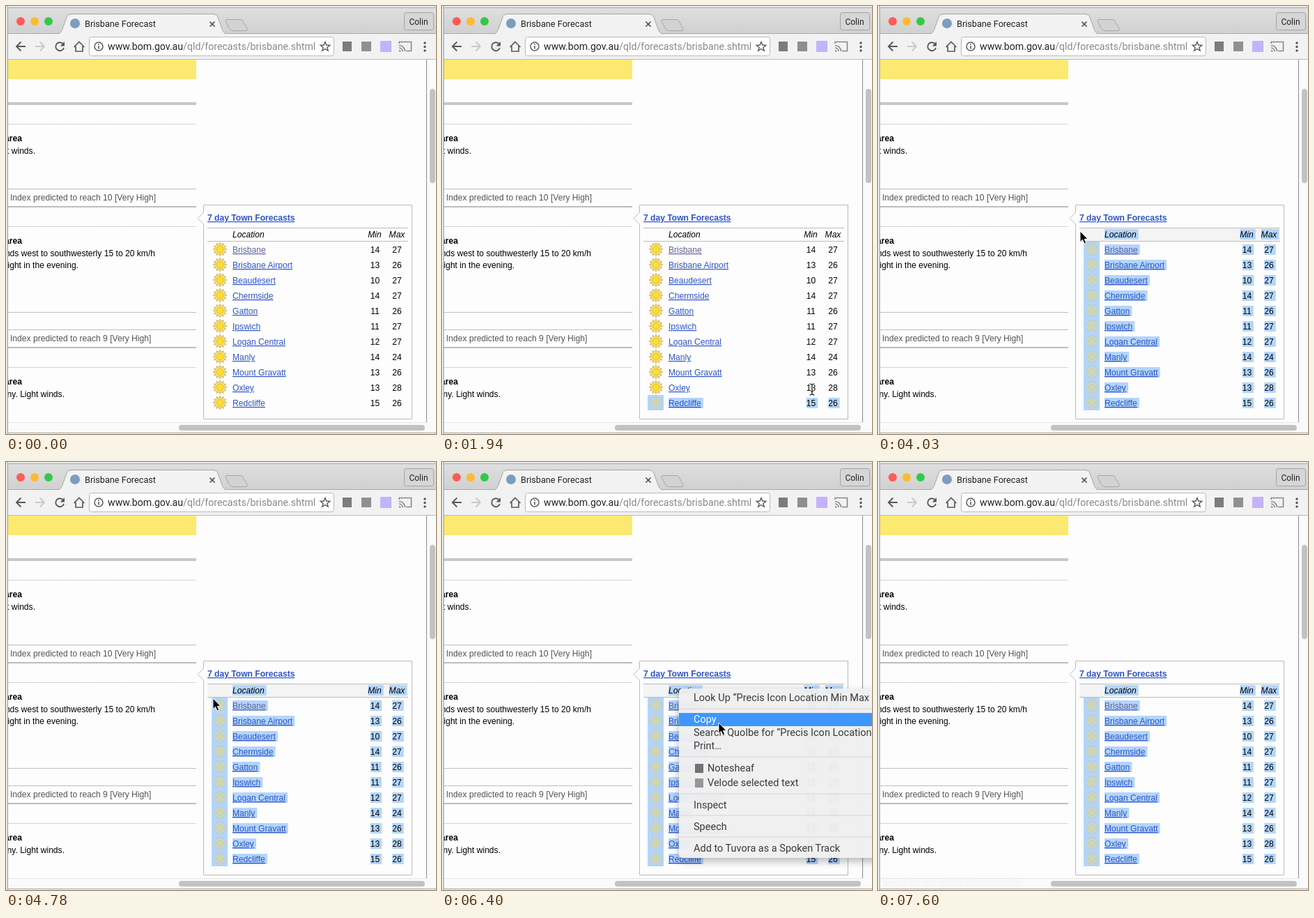
An HTML page for the animation above (8000 ms loop, 617x614 px).

```html
<!DOCTYPE html>
<html lang="en">
<head>
<meta charset="utf-8">
<title>Brisbane Forecast</title>
<style>
html, body { margin: 0; width: 100%; height: 100%; overflow: hidden; background: #fff; }
svg { display: block; width: 617px; height: 614px; }
text { white-space: pre; font: 12.1px "Liberation Sans", Arial, sans-serif; fill: #000; }
.ui { font-family: Roboto, "Open Sans", sans-serif; }
.link { fill: #2f55c4; text-decoration: underline; }
.seen { fill: #62629a; }
.bold { font-weight: bold; }
.head { font-style: italic; }
.mid { text-anchor: middle; }
.end { text-anchor: end; }
.note { fill: #555; }
.item { font-size: 14.5px; fill: #3a3a3a; }
.icon { fill: none; stroke: #5a5a5a; stroke-width: 1.9; }
</style>
</head>
<body>
<svg id="stage" viewBox="0 0 617 614">
  <defs>
    <linearGradient id="strip" x1="0" y1="0" x2="0" y2="1">
      <stop offset="0" stop-color="#e0e0e0"/><stop offset="1" stop-color="#d0d0d0"/>
    </linearGradient>
    <g id="sun"></g>
    <filter id="shade" x="-10%" y="-10%" width="120%" height="125%">
      <feDropShadow dx="0" dy="5" stdDeviation="6" flood-color="#000" flood-opacity=".28"/>
    </filter>
  </defs>
  <rect width="617" height="614" fill="#fdfdfd"/>
  <g id="page"></g>
  <g id="panel"></g>
  <g id="bars">
    <path d="M603.5 77V597" stroke="#8c8c8c"/>
    <rect x="604" y="77" width="13" height="535" fill="#fafafa"/>
    <rect x="3" y="597" width="614" height="15" fill="#fafafa"/>
    <path d="M3 597.5H604" stroke="#e6e6e6"/>
    <rect x="608" y="119" width="8" height="135" rx="4" fill="#c2c2c2"/>
    <rect x="248" y="601" width="353" height="8" rx="4" fill="#c2c2c2"/>
  </g>
  <g id="chrome">
    <rect width="617" height="40" fill="url(#strip)"/>
    <rect width="617" height="2" fill="#e9e9e9"/>
    <path d="M2 2.5H617" stroke="#a8a8a8"/>
    <rect x="3" y="39" width="614" height="37" fill="#f2f2f2"/>
    <path d="M3 39.5H617" stroke="#ababab"/>
    <path d="M3 76.5H617" stroke="#bdbdbd"/>
    <path d="M74 40C79 39 79 37 81 33L87 16Q89 11.500 93 11.500H298Q302 11.500 304 16L310 33C312 37 312 39 317 40" fill="#f2f2f2" stroke="#a4a4a4"/>
    <path d="M318 19.500H337Q339 19.500 340 21.500L346 33Q347 35.500 344 35.500H325Q322 35.500 321 33L315 22Q314 19.500 318 19.500Z" fill="#d3d3d3" stroke="#a6a6a6"/>
    <circle cx="99" cy="25" r="7" fill="#7d9cc0"/>
    <path d="M292.500 22.500l7 7m0-7l-7 7" stroke="#444" stroke-width="1.500"/>
    <rect x="571.500" y="9.500" width="42" height="25" rx="3" fill="#d6d6d6" stroke="#a2a2a2"/>
    <rect x="119.500" y="44.500" width="351" height="27" rx="3" fill="#fff" stroke="#b9b9b9"/>
    <path class="icon" d="M28 58H15.500M21.500 51.500L15 58l6.500 6.500"/>
    <path class="icon" d="M42 58H54.500M48.500 51.500L55 58l-6.500 6.500" style="stroke:#cacaca"/>
    <path class="icon" d="M82 54.500A6 6 0 1 0 83 60"/>
    <path d="M84 51V57.500H77.500Z" fill="#5a5a5a"/>
    <path class="icon" d="M97.500 59L105 51.500 112.500 59M100 57.500V65H110V57.500" style="stroke-width:1.700"/>
    <circle class="icon" cx="133" cy="58" r="6" style="stroke-width:1.500"/>
    <path d="M133 57V61.500M133 54V55.700" stroke="#5a5a5a" stroke-width="1.600"/>
    <path class="icon" d="M458 51.500L459.800 56 464.700 56.300 460.900 59.400 462.200 64.200 458 61.500 453.800 64.200 455.100 59.400 451.300 56.300 456.200 56Z" style="stroke-width:1.400"/>
    <rect x="483" y="51" width="13" height="14" fill="#7c7c7c"/>
    <rect x="510" y="51" width="14" height="14" fill="#8f8f8f"/>
    <rect x="537" y="50" width="16" height="16" fill="#c2b3fc"/>
    <path class="icon" d="M564 54V51.500H581.500V64.500H574M564 56.500A8.500 8.500 0 0 1 572.500 65M564 60A5 5 0 0 1 569 65" style="stroke:#888;stroke-width:1.600"/>
    <path d="M564 63V65.500H566.500A2.500 2.500 0 0 0 564 63Z" fill="#888"/>
    <g fill="#555"><circle cx="601" cy="53" r="1.700"/><circle cx="601" cy="58.500" r="1.700"/><circle cx="601" cy="64" r="1.700"/></g>
  </g>
  <rect width="2" height="614" fill="#e6e6e6"/>
  <rect x="2" width="1" height="614" fill="#a0a0a0"/>
  <path d="M2 612.500H617" stroke="#a0a0a0"/>
  <g id="status">
    <rect x="2.500" y="595.500" width="203" height="17" fill="#f1f1f1" stroke="#c8c8c8"/>
  </g>
  <g id="menu"></g>
  <path id="arrow" d="M0 0V15.500L3.500 12.200 6 18 8.700 16.900 6.300 11.300H11Z" stroke="#fff" stroke-width="1"/>
  <g id="beam" fill="none">
    <path d="M-3.500-8Q0-8 0-5.500V5.500Q0 8-3.500 8M3.500-8Q0-8 0-5.500V5.500Q0 8 3.500 8M-2 3H2" stroke="#fff" stroke-width="2.800"/>
    <path d="M-3.500-8Q0-8 0-5.500V5.500Q0 8-3.500 8M3.500-8Q0-8 0-5.500V5.500Q0 8 3.500 8M-2 3H2" stroke="#111" stroke-width="1.200"/>
  </g>
</svg>
<script>
const $ = id => document.getElementById(id);
const BLUE = '#b2d5fd', TICK = 149, LOOP = 8000;

function add(parent, tag, attrs, str) {
  const el = document.createElementNS('http://www.w3.org/2000/svg', tag);
  for (const k in attrs) el.setAttribute(k, attrs[k]);
  if (str) el.textContent = str;
  parent.append(el);
  return el;
}
const text = (p, x, y, str, cls = '') => add(p, 'text', { x, y, class: cls }, str);
const box = (p, x, y, width, height, fill) => add(p, 'rect', { x, y, width, height, fill });
const line = (p, x1, x2, y, stroke, w = 1, dash = 'none') =>
  add(p, 'path', { d: `M${x1} ${y}H${x2}`, stroke, 'stroke-width': w, 'stroke-dasharray': dash });
const show = (el, on) => { el.style.display = on ? '' : 'none'; };

// Browser labels
const chrome = $('chrome');
for (const [x, c] of [[21, '#fc5b57'], [41, '#fcbb33'], [61, '#34c84a']])
  add(chrome, 'circle', { cx: x, cy: 22, r: 6, fill: c });
text(chrome, 113, 30, 'Brisbane Forecast', 'ui').style.cssText = 'font-size:12.7px;fill:#222';
text(chrome, 592, 27, 'Colin', 'ui mid').style.cssText = 'font-size:12px;fill:#222';
const url = text(chrome, 146, 63, '', 'ui');
url.style.fontSize = '14.15px';
add(url, 'tspan', { fill: '#222' }, 'www.bom.gov.au');
add(url, 'tspan', { fill: '#888' }, '/qld/forecasts/brisbane.shtml');
text($('status'), 7, 608, 'www.bom.gov.au/qld/forecasts/bris…', 'ui note');

// Left column
const page = $('page');
box(page, 3, 77, 270, 28, '#fbe972');
line(page, 3, 273, 140, '#c8c8c8', 4);
for (const y of [169.5, 316.5, 518.5]) line(page, 3, 273, y, '#aaa', 1, '1 1');
for (const y of [262.5, 439.5, 464.5]) line(page, 3, 273, y, '#bdbdbd');
for (const y of [288, 490]) line(page, 3, 273, y, '#bdbdbd', 2);
for (const y of [194, 341, 543]) text(page, 23, y, 'Brisbane area', 'bold end');
text(page, 42, 212, 'Light winds.', 'end');
text(page, 214, 359, 'Winds west to southwesterly 15 to 20 km/h', 'end');
text(page, 104, 376, 'becoming light in the evening.', 'end');
text(page, 84, 561, 'Sunny. Light winds.', 'end');
text(page, 6, 279, 'Index predicted to reach 10 [Very High]', 'note');
text(page, 6, 481, 'Index predicted to reach 9 [Very High]', 'note');

// Sun symbol
const rays = Array.from({ length: 24 }, (_, i) => {
  const r = i % 2 ? 7.5 : 10.8, a = i * Math.PI / 12;
  return `${(r * Math.sin(a)).toFixed(1)},${(-r * Math.cos(a)).toFixed(1)}`;
});
add($('sun'), 'polygon', { points: rays.join(' '), fill: '#d9c06c' });
add($('sun'), 'circle', { r: 6.8, fill: '#fff3a0' });
add($('sun'), 'circle', { r: 5.2, fill: '#fbdd35', stroke: '#e3b622' });

// Forecast table
const panel = $('panel');
add(panel, 'path', { d: 'M283.5 285.5H582.5V592.5H283.5V313L275 304.500 283.500 296Z', fill: '#fdfdfd', stroke: '#bbb' });
const hover = box(panel, 289, 319, 288, 18, '#f4f4f4');
line(panel, 289, 577, 318.5, '#bbb');
line(panel, 289, 577, 337.5, '#bbb');
text(panel, 289, 308, '7 day Town Forecasts', 'link bold');

const towns = [
  ['Brisbane', 14, 27], ['Brisbane Airport', 13, 26], ['Beaudesert', 10, 27],
  ['Chermside', 14, 27], ['Gatton', 11, 26], ['Ipswich', 11, 27],
  ['Logan Central', 12, 27], ['Manly', 14, 24], ['Mount Gravatt', 13, 26],
  ['Oxley', 13, 28], ['Redcliffe', 15, 26]
];
const cells = [];
function cell(row, x, y, str, cls) {
  const back = box(panel, x, y - 12, 10, 15, BLUE);
  const el = text(panel, x, y, str, cls);
  const w = el.getComputedTextLength();
  const left = cls.includes('mid') ? x - w / 2 : x;
  cells.push({ row, left, right: left + w + 3, back });
}
cell(-1, 325, 332, 'Location', 'head');
cell(-1, 529, 332, 'Min', 'head mid');
cell(-1, 561, 332, 'Max', 'head mid');
towns.forEach(([name, min, max], i) => {
  const y = 354 + 22 * i;
  const back = box(panel, 295, y - 16, 23, 22, BLUE);
  const sun = add(panel, 'use', { href: '#sun', x: 307, y: y - 5 });
  cells.push({ row: i, left: 295, right: 318, back, sun });
  cell(i, 325, y, name, i ? 'link' : 'link seen');
  cell(i, 529.5, y, String(min), 'mid');
  cell(i, 561, y, String(max), 'mid');
});

// Context menu
const menu = $('menu');
const sheet = add(menu, 'rect', { x: 340, y: 325, width: 320, height: 243, rx: 5, fill: '#f0f0f0', filter: 'url(#shade)' });
const glow = box(menu, 340, 360, 300, 19, '#3f97fb');
for (const y of [354, 423, 476, 507, 538]) line(menu, 340, 617, y, '#dedede', 1.5);
const items = [
  [343, 'Look Up “Precis Icon Location Min Max Brisbane…”'], [374, 'Copy'],
  [393, 'Search Quolbe for “Precis Icon Location Min Max…”'], [412, 'Print…'],
  [444, 'Notesheaf', '#737373'], [465, 'Velode selected text', '#979797'],
  [497, 'Inspect'], [528, 'Speech'], [559, 'Add to Tuvora as a Spoken Track']
].map(([y, str, mark]) => {
  if (mark) box(menu, 363, y - 11, 12, 13, mark);
  return { y, el: text(menu, mark ? 381 : 361, y, str, 'ui item') };
});

// Pointer path: tick, x, y
const path = [
  [2, 600, 20], [4, 593, 300], [6, 565, 568], [7, 565, 568], [8, 568, 569], [12, 568, 569],
  [13, 531, 550], [19, 344, 343], [20, 308, 317], [23, 284, 316], [26, 284, 316],
  [27, 290, 323], [28, 290, 323], [29, 291, 328], [32, 297, 339], [33, 303, 338],
  [36, 331, 331], [37, 337, 327], [38, 337, 327], [39, 342, 332], [41, 370, 353],
  [43, 397, 374], [46, 397, 374], [47, 400, 385], [48, 412, 430], [50, 465, 575], [51, 476, 630]
];
function pointer(k) {
  const n = path.findIndex(p => p[0] >= k);
  if (n < 0) return [476, 630];
  if (n === 0) return k < 2 ? [-50, -50] : path[0].slice(1);
  const [a, ax, ay] = path[n - 1], [b, bx, by] = path[n];
  const f = (k - a) / (b - a);
  return [Math.round(ax + (bx - ax) * f), Math.round(ay + (by - ay) * f)];
}

function select(k, x, y) {
  const row = k >= 20 ? -2 : Math.floor((y - 338) / 22);
  const from = k === 13 ? 999 : x + 9;
  for (const c of cells) {
    const start = c.row > row ? c.left : Math.max(c.left, from);
    const partial = c.sun && start > c.left;
    const on = k >= 13 && c.row >= row && start < c.right && !partial;
    show(c.back, on);
    if (c.sun) c.sun.style.opacity = on ? .36 : 1;
    if (!on) continue;
    c.back.setAttribute('x', start);
    c.back.setAttribute('width', c.right - start);
  }
}

function draw(t) {
  const k = Math.floor((t + 8) / TICK);
  const [x, y] = pointer(k);
  const beam = k >= 13 && k < 20;
  show($('beam'), beam);
  show($('arrow'), !beam);
  $(beam ? 'beam' : 'arrow').setAttribute('transform', `translate(${x} ${y})`);
  select(k, x, y);

  show(hover, k >= 20);
  hover.setAttribute('width', k < 46 ? 288 : 35);

  show(menu, k >= 37 && k < 46);
  menu.style.opacity = k === 45 ? .5 : 1;
  sheet.style.opacity = k < 39 ? 1 : .96;
  let lit = false;
  for (const { y: base, el } of items) {
    const on = x > 340 && y >= base - 14 && y < base + 5 && k !== 44;
    el.style.fill = on ? '#fff' : '';
    if (on) { lit = true; glow.setAttribute('y', base - 14); }
  }
  show(glow, lit);

  show($('status'), k >= 46);
  $('status').style.opacity = k < 49 ? .95 : k === 49 ? .7 : k === 50 ? .35 : .04;
}

const begin = performance.now();
function tick() {
  draw((performance.now() - begin) % LOOP);
  requestAnimationFrame(tick);
}
tick();
</script>
</body>
</html>
```
